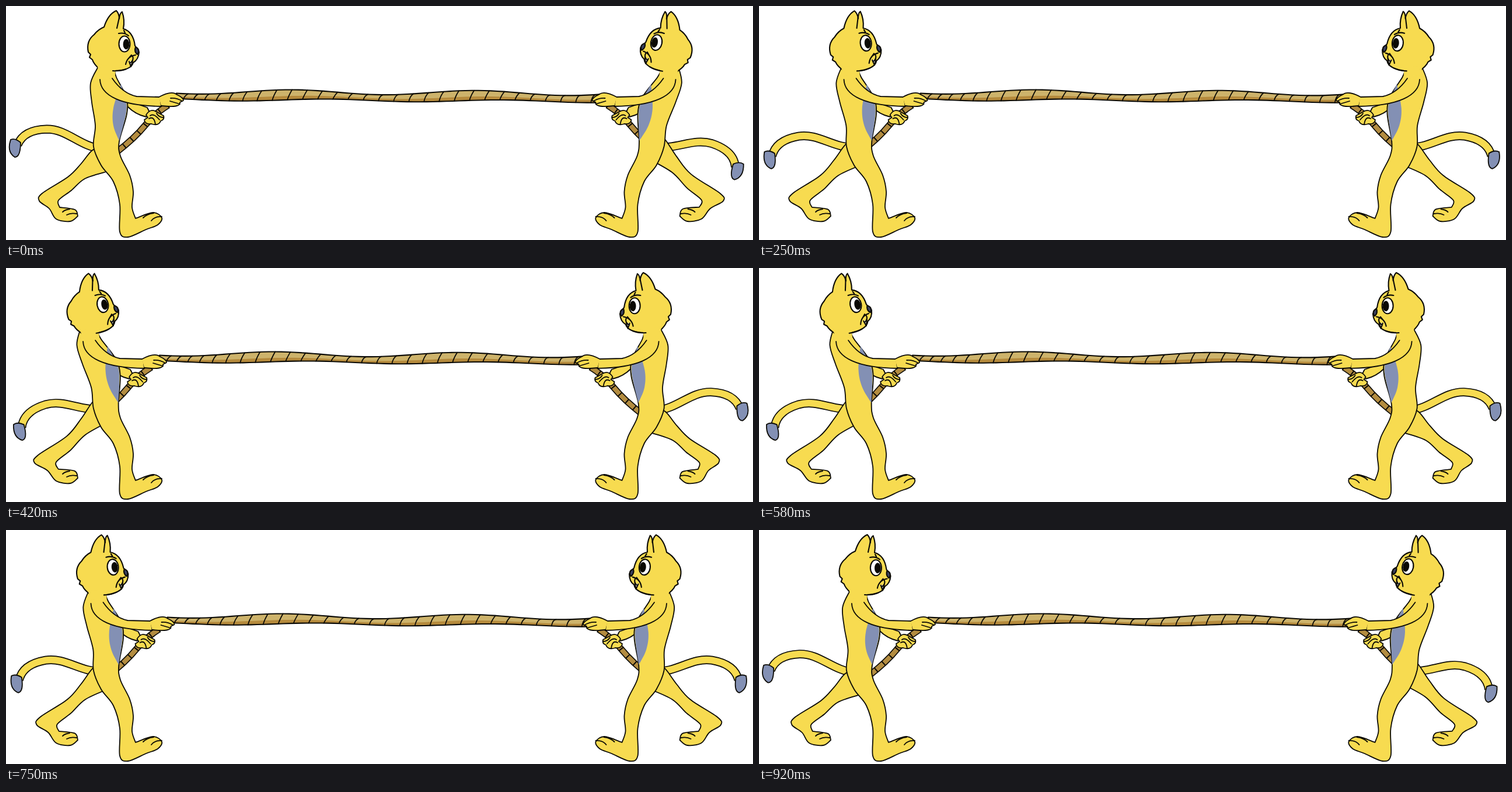
An HTML page for the animation above (1.01 s loop, 1280 by 401 pixels).

```html
<!DOCTYPE html>
<html lang="en">
<head>
<meta charset="utf-8">
<title>Tug of war</title>
<style>
  html, body { margin: 0; width: 100%; height: 100%; overflow: hidden; background: #fff; }
  svg { display: block; width: 1280px; height: 401px; }
  path, ellipse { stroke: #0b0a05; stroke-width: 1.8; stroke-linejoin: round; stroke-linecap: round; fill: none; }
  .fur { fill: #f7db50; }
  .blue { fill: #8390b4; }
  .nose { fill: #3a4060; }
  .white { fill: #fff; }
  .black { fill: #0b0a05; }
  .light { fill: #cdb36b; }
  .dark { fill: #b58a3c; }
  .bare { stroke: none; }
  .bold, .head path { stroke-width: 2.1; }
</style>
</head>
<body>
<svg id="stage" viewBox="0 0 1280 401"></svg>
<script>
const STARTS = [0, 80, 170, 250, 330, 420, 500, 580, 670, 750, 830, 920];
const LOOP = 1010, SWAY = 31, MIRROR = 1277.5;
const clamp = v => Math.min(1, Math.max(0, v));

// Smooth line through "x y x y ..." key points, each moved by warp; "|" marks a corner.
function curve(text, warp) {
  let d = '', last;
  for (const run of text.split('|')) {
    const pts = run.match(/\S+ \S+/g).map(pair => warp(...pair.split(' ').map(Number)));
    if (last) pts.unshift(last); else d = 'M' + pts[0];
    for (let i = 0; i < pts.length - 1; i++) {
      const a = pts[i], b = pts[i + 1], before = pts[i - 1] || a, after = pts[i + 2] || b;
      const c1 = a.map((v, k) => v + (b[k] - before[k]) / 6);
      const c2 = b.map((v, k) => v - (after[k] - a[k]) / 6);
      d += `C${c1} ${c2} ${b}`;
    }
    last = pts.at(-1);
  }
  return d;
}
const draw = (cls, d, style = '') => `<path class="${cls}" d="${d}" style="${style}"/>`;
const oval = (cls, x, y, rx, ry) => `<ellipse class="${cls}" cx="${x}" cy="${y}" rx="${rx}" ry="${ry}"/>`;
const group = (transform, ...parts) => `<g transform="${transform}">${parts.join('')}</g>`;
const strip = (d, color, width) =>
  draw('', d, `stroke-width:${width + 3.4};stroke-linecap:butt`) + draw('', d, `stroke:${color};stroke-width:${width};stroke-linecap:butt`);

const tail =
  strip('M164 245C125 240 105 211 70 211Q30 212 20 238', '#f7db50', 11.5) +
  draw('blue', 'M8 229Q16 226 25 234Q25 259 15 259Q1 250 8 229');

const lowRopePath = 'M278 170Q255 184 238 205T190 250';
const lowRope = strip(lowRopePath, '#b38c40', 8) +
  draw('', lowRopePath, 'stroke-width:9;stroke-linecap:butt;stroke-dasharray:2 15');

const farArm =
  draw('fur', 'M198 158Q225 168 242 174L246 182 240 190Q222 186 208 172') +
  draw('fur', 'M240 187Q247 174 259 182L270 188Q272 195 265 197Q262 206 249 202Q238 203 237 195L243 191Z') +
  draw('', 'M247 188Q253 183 263 195M245 193Q254 188 256 203M258 184Q262 191 270 191');

const nearArm =
  draw('fur', 'M161 126C162 154 198 171 266 172L264 156 224 155Q200 150 182 124') +
  draw('fur', 'M262 156Q284 144 293 152Q304 157 304 162L298 165Q300 175 266 171') +
  draw('', 'M282 158Q292 157 302 163M281 163L298 168');

const head =
  draw('fur', 'M160 108Q150 99 148 92L143 88 145 83 141 79Q137 60 151 49Q158 40 168 36Q175 14 189 8Q194 13 194 22Q195 12 199 10Q204 24 201 39Q218 44 221 68L228 79Q227 92 218 97Q214 111 183 111') +
  draw('fur bare', 'M157 100L188 104 187 119 158 117Z') +
  draw('', 'M194 20L190 38M183 111Q196 112 206 108M193 47Q203 45 210 51M202 42L204 46') +
  oval('white bold', 203, 65, 9.5, 13.5) + oval('black', 206, 65.5, 4.5, 8) +
  draw('nose', 'M222 70Q231 75 225 83Q219 78 222 70') +
  draw('white', 'M211 95L214 104 217 94') +
  draw('', 'M222 84Q208 86 205 100M215 84L209 91M217 86Q220 93 212 98');

// The upper body leans back from the hip, the rear leg stretches towards its heel.
const leanBack = lean => (x, y) => [x - lean * SWAY * Math.max(0, (240 - y) / 130) ** 1.1, y];
const stretch = lean => (x, y) => [
  x - lean * .13 * (123 - x) * clamp((360 - y) / 25),
  y - lean * .35 * Math.max(0, x - 85) * clamp((360 - y) / 100)
];

const hindLeg = lean =>
  draw('fur', curve('165 240 147 248 128 271 106 293 62 321 57 334 74 347 86 365 110 369 123 360|118 349 92 345|90 333 112 316 135 296 172 284', stretch(lean))) +
  draw('', 'M121 356Q111 354 104 358M109 348Q101 349 97 353');

const body = lean =>
  draw('fur', curve('158 104 145 132 147 165 153 205 150 241 163 273 184 301 195 340 195 387 209 396 240 383 260 375 267 363 252 354 222 364|216 345 218 318 212 290 196 257 194 232 207 185 206 156 189 122 186 108', leanBack(lean))) +
  draw('blue bare', curve('197 134 205 160 206 183 194 231|184 205 184 175 197 134', leanBack(lean))) +
  draw('', 'M267 361Q255 360 249 368M253 355Q242 356 235 363');

// lean: 0 upright, 1 pulled back
const cat = lean => {
  const withRope = `translate(${-SWAY * lean})`;
  return group(`translate(${3 * lean}) rotate(${-17 * lean} 150 241)`, tail) + hindLeg(lean) +
    group(withRope, lowRope, farArm) + body(lean) +
    `<g class="head">${group(`${withRope} translate(0 ${3 * lean}) rotate(${-11.5 * lean} 172 107)`, head)}</g>` +
    group(withRope, nearArm);
};

// The rope swells and thins in slow waves.
const wave = (x, peak, period) => Math.cos((x - peak) / period * 2 * Math.PI);
const ropeTop = x => 147.5 + (x - 490) * .004 - 4 * wave(x, 490, 315);
const ropeBottom = x => 160.7 + (x - 400) * .005 + 2 * wave(x, 400, 300);
const ropeMiddle = x => ropeTop(x) * .38 + ropeBottom(x) * .62;
function band(upper, lower) {
  const up = [], down = [];
  for (let x = 292; x <= 1018; x += 11) {
    up.push([x, upper(x)]);
    down.unshift([x, lower(x)]);
  }
  return 'M' + [...up, ...down].join('L') + 'Z';
}
let twists = '';
for (let x = 308; x < 1010; x += Math.min(26, 17 + (x - 300) / 14))
  twists += `M${x - 4} ${ropeBottom(x - 4)}Q${x - 2} 154 ${x + 4} ${ropeTop(x + 4)}`;
const rope = draw('light bare', band(ropeTop, ropeBottom)) + draw('dark bare', band(ropeMiddle, ropeBottom)) +
  draw('', twists) + draw('bold', band(ropeTop, ropeBottom));

const stage = document.getElementById('stage');
let shown = -1;
function frame(now) {
  const t = now % LOOP;
  const step = STARTS.filter(start => start <= t).length - 1;
  if (step !== shown) {
    shown = step;
    const lean = (1 - Math.cos(step / 6 * Math.PI)) / 2;
    stage.innerHTML = group(`translate(${-SWAY * lean})`, rope) + cat(lean) +
      group(`translate(${MIRROR}) scale(-1 1)`, cat(1 - lean));
  }
  requestAnimationFrame(frame);
}
frame(0);
</script>
</body>
</html>
```
